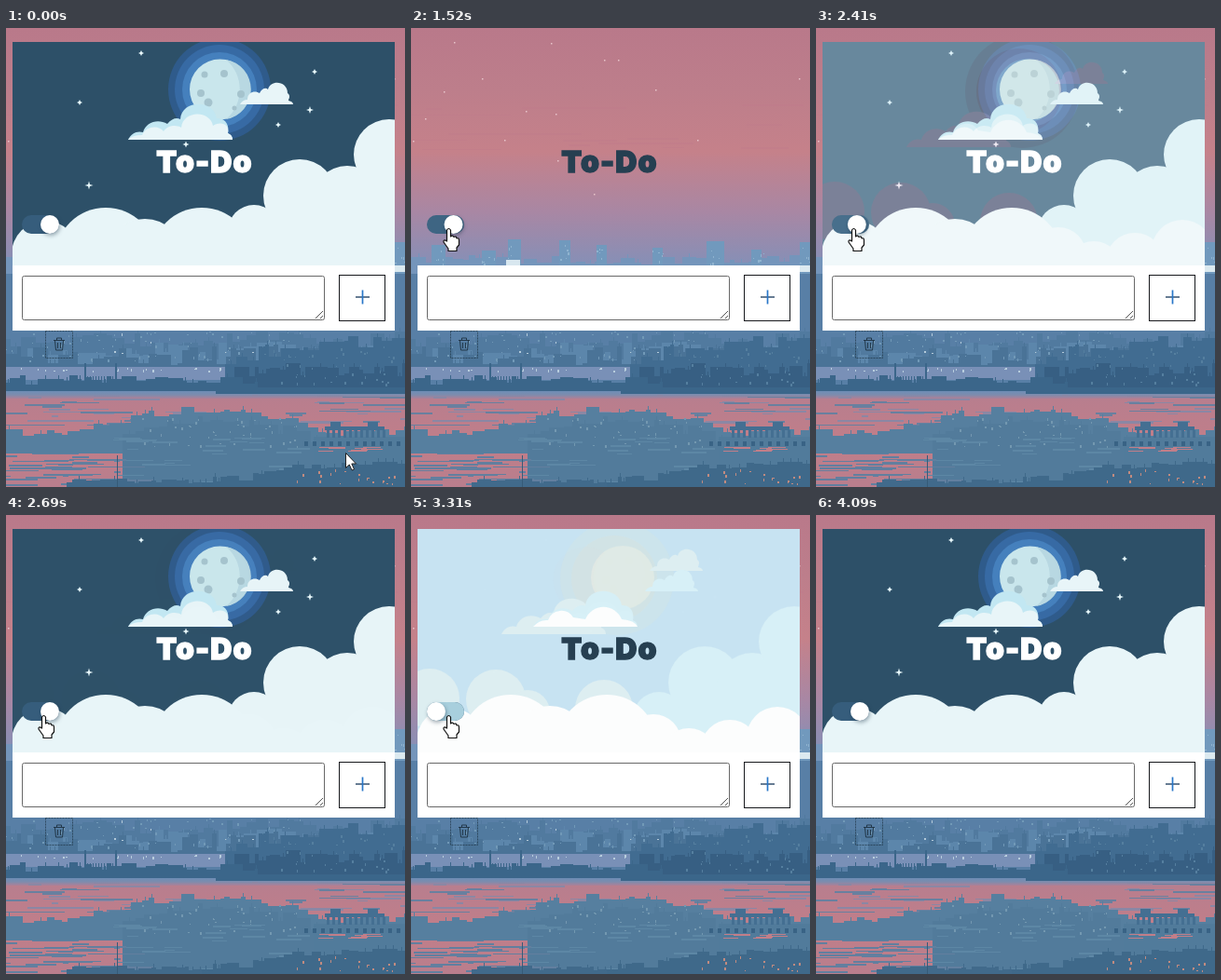
These frames come from a looping animation (428 by 493 pixels, 4560 ms). An HTML page with a canvas:

```html
<!DOCTYPE html>
<html lang="en">
<head>
<meta charset="utf-8">
<title>To-Do</title>
<style>
  html, body { margin: 0; width: 100%; height: 100%; overflow: hidden; }
  body { position: relative; background: #bd7e8b; }
  canvas, svg.scene { position: absolute; left: 0; top: 0; width: 428px; height: 493px; display: block; }
  .title {
    font: 900 32px Inter, "Open Sans", sans-serif; letter-spacing: 1.1px; text-anchor: middle;
    fill: currentColor; stroke: currentColor; stroke-width: 1.4;
  }
  .knob { filter: drop-shadow(1px 2px 2px rgba(20, 45, 65, .4)); }
  .thin { fill: none; stroke: #22384a; }
</style>
</head>
<body>
<canvas id="city" width="428" height="493"></canvas>
<svg class="scene" viewBox="0 0 428 493">
  <defs>
    <path id="moonCloud" d="M131 120C134 113 141 110 147 112C150 101 163 97 173 103C178 97 183 96 187 98C188 77 223 76 226 97C236 96 240 106 238 113Q243 115 243 120Z"/>
    <path id="sideCloud" d="M251 82Q254 77 259 77C259 68 268 67 272 70C275 64 279 64 281 66C284 55 302 57 302 70C306 73 303 76 303 78Q308 79 308 82Z"/>
    <g id="leftBank"></g>
    <g id="rightBank"></g>
  </defs>

  <svg id="banner" x="7" y="15" width="410" height="240" viewBox="7 15 410 240">
    <g>
      <rect x="7" y="15" width="410" height="240" fill="#2d5068"/>
      <circle cx="229" cy="66" r="55" fill="#2f5b8b"/>
      <circle cx="229" cy="66" r="48" fill="#376aa4"/>
      <circle cx="229" cy="66" r="40" fill="#4580bd"/>
      <circle cx="229.500" cy="66" r="32.500" fill="#c9e6ec"/>
      <path d="M236 34A32.500 32.500 0 0 1 236 98A42 42 0 0 0 236 34Z" fill="#b8d8e2"/>
      <g id="craters" fill="#a5c3cd"></g>
      <g id="stars" fill="#e8f8fb"></g>
      <use href="#moonCloud" fill="#c2e7f2"/>
      <path d="M131 120Q135 115 146 115C150 105 164 104 169 111C174 104 183 104 188 107C190 88 219 88 222 105C232 99 240 105 238 113Q243 115 243 120Z" fill="#e8f5f8"/>
      <g fill="#e8f5f8">
        <use href="#sideCloud"/>
        <use href="#leftBank"/>
        <use href="#rightBank"/>
      </g>
    </g>
    <g id="day">
      <rect x="7" y="15" width="410" height="240" fill="#c8e4f3"/>
      <g id="halo">
        <circle cx="221" cy="68" r="61" opacity=".4"/>
        <circle cx="218" cy="68" r="46" opacity=".75"/>
      </g>
      <circle cx="227" cy="67" r="34" fill="#e0ebe6"/>
      <path id="glow" d="M208 41A35 35 0 1 0 211 95A33 33 0 0 1 208 41Z" fill="#e68480"/>
      <g id="backClouds">
        <g id="backBank"></g>
        <use href="#moonCloud" x="-34" y="8"/>
        <use href="#sideCloud" x="5" y="-22"/>
      </g>
      <g fill="#d7f0f7">
        <use href="#sideCloud"/>
        <use href="#moonCloud"/>
        <use href="#rightBank"/>
      </g>
      <g fill="#fdfefe">
        <path d="M131 120Q138 112 147 113A15 15 0 0 1 174 110L187 112A21 21 0 0 1 226 112Q240 113 243 120Z"/>
        <use href="#leftBank"/>
        <g id="frontBank"></g>
      </g>
    </g>
  </svg>

  <text class="title" id="title" x="213" y="155">To-Do</text>
  <rect x="17" y="201" width="40" height="20" rx="10" fill="#365d7c"/>
  <rect id="dayTrack" x="17" y="201" width="40" height="20" rx="10" fill="#a8cfdd"/>
  <circle class="knob" id="knob" cy="211" r="10" fill="#fff"/>

  <rect x="7" y="255" width="410" height="70" fill="#fff"/>
  <rect x="17.500" y="266.500" width="324" height="47" rx="2" fill="#fff" stroke="#686868"/>
  <path d="M332 312L340 304M337 312L340 309" stroke="#555"/>
  <rect x="357.500" y="265.500" width="49" height="49" fill="#fff" stroke="#17191d"/>
  <path d="M375 289H390" stroke="#35516f" stroke-width="1.500"/>
  <path d="M382.500 281.500V296.500" stroke="#2877c8" stroke-width="1.700"/>

  <rect class="thin" x="42.500" y="325.500" width="29" height="29" stroke-dasharray="2 1" opacity=".75"/>
  <path class="thin" d="M51 335.500H63M54.500 335V333H59.500V335M52.500 336L53.500 346H60.500L61.500 336M55.500 338V344M58.500 338V344"/>

  <path id="arrow" d="M.5.5V16.500L4.300 13L7 19L9.500 18L6.800 12H11.500Z" fill="#fff" stroke="#222"/>
  <path id="hand" d="M-2 2Q0-1 2 2V9Q4 7 5.500 9.500Q8 8 8.500 11Q11 10 11 13V18L8.500 21V24.500H-.5V22L-5.500 15Q-6 11.500-2 14Z" fill="#fff" stroke="#111" stroke-width="1.200" stroke-linejoin="round"/>
</svg>

<script>
const $ = id => document.getElementById(id);

// ---- Banner details ----
const puffs = list => list.map(([x, y, r]) => `<circle cx="${x}" cy="${y}" r="${r}"/>`).join('');
const floor = (x, y, w) => `<rect x="${x}" y="${y}" width="${w}" height="${255 - y}"/>`;
const star = ([x, y, r]) =>
  `<path d="M${x} ${y - r}l1 ${r - 1} ${r - 1} 1 ${1 - r} 1 -1 ${r - 1} -1 ${1 - r} ${1 - r} -1 ${r - 1} -1Z"/>`;

$('craters').innerHTML = puffs([[213, 50, 3.5], [209, 70, 4], [234, 49, 4], [217, 80, 4.5], [252, 71, 4], [245, 86, 2.5]]);
$('stars').innerHTML = [[145, 27, 3], [79, 80, 3], [331, 47, 3], [326, 88, 4], [292, 104, 3], [89, 169, 4.5], [193, 125, 3.5]].map(star).join('');
$('leftBank').innerHTML = puffs([[42, 243, 36], [107, 247, 54], [149, 246, 41], [210, 247, 54]]) + floor(7, 238, 410);
$('rightBank').innerHTML = puffs([[266, 218, 28], [315, 180, 39], [366, 186, 38], [411, 136, 38]]) +
  floor(245, 212, 172) + floor(290, 185, 127) + floor(380, 150, 37);
$('backBank').innerHTML = puffs([[20, 197, 32], [91, 198, 32], [125, 212, 24], [207, 208, 31]]);
$('frontBank').innerHTML = puffs([[260, 244, 30], [298, 259, 30], [342, 251, 31], [393, 239, 33]]);

// ---- Pixel city ----
const ctx = $('city').getContext('2d');
let seed = 29;
const rand = () => (seed = (seed * 16807) % 2147483647) / 2147483647;
const between = (a, b) => Math.floor(a + rand() * (b - a));
const hump = (x, from, to) => Math.sin(Math.PI * Math.min(1, Math.max(0, (x - from) / (to - from))));

function box(x, y, w, h, color) {
  ctx.fillStyle = color;
  ctx.fillRect(x, y, w, h);
}
function shade(y, bottom, ...colors) {
  const fill = ctx.createLinearGradient(0, y, 0, bottom);
  colors.forEach((color, i) => fill.addColorStop(i / (colors.length - 1), color));
  box(0, y, 428, bottom - y, fill);
}
// Blocks with random widths and jitter around the roof line roof(x)
function skyline(from, to, roof, jitter, bottom, color) {
  for (let x = from; x < to;) {
    const w = Math.min(between(4, 17), to - x), y = Math.round(roof(x) - rand() * jitter);
    box(x, y, w, bottom - y, color);
    if (rand() > .6) box(x + (w >> 1), y - 4, 1, 4, color);
    x += w;
  }
}
// Streaks thin out from the first edge to the second
function streaks(count, x0, x1, near, far, long, color) {
  for (let i = 0; i < count; i++) box(between(x0, x1), Math.round(near + (far - near) * rand() ** 1.5), between(6, long), between(1, 3), color);
}
function windows(count, x0, x1, y0, y1, color) {
  for (let i = 0; i < count; i++) box(between(x0, x1), between(y0, y1), between(1, 3), between(1, 4), color);
}

function paintCity() {
  shade(0, 265, '#b9798a', '#bd7e8b', '#c5818a', '#a887a4', '#7f91ba');
  streaks(14, -30, 400, 130, 80, 150, 'rgba(190,120,140,.3)');
  for (let i = 0; i < 16; i++) box(between(0, 428), between(10, 185), 1.5, 1.5, '#e7c4ca');

  // Far towers
  skyline(0, 428, () => 254, 10, 330, '#7495bb');
  for (let x = 22; x < 428; x += between(28, 62)) {
    const y = between(227, 243);
    box(x, y, between(10, 20), 100, '#7199bd');
    windows(5, x, x + 14, y + 3, 254, '#8fb3cf');
  }
  box(102, 249, 15, 6, '#d8e7ef');
  box(0, 264, 428, 130, '#587fa6');
  box(417, 255, 11, 7, '#dceaf0');

  // Middle district, darker to the right
  skyline(0, 428, () => 343, 18, 372, '#517a9f');
  skyline(0, 428, () => 357, 20, 372, '#5c86ab');
  skyline(0, 428, () => 362, 22, 372, '#4a7397');
  windows(75, 0, 330, 326, 358, '#7199b7');
  windows(9, 80, 310, 328, 350, '#b3cad9');

  // Waterfront
  box(0, 364, 265, 14, '#7990b7');
  windows(25, 0, 260, 365, 369, '#b7cddd');
  skyline(235, 428, x => 366 - 22 * hump(x, 220, 540), 14, 392, '#416c91');
  skyline(245, 428, () => 374, 14, 392, '#375f83');
  windows(45, 270, 425, 342, 384, '#557f9f');
  skyline(0, 270, () => 383, 10, 390, '#3b668a');
  for (const x of [84, 117]) box(x, 360, 2, 27, '#3b668a');
  for (let x = 87; x < 116; x += 3) box(x, 374, 1, 11, '#3b668a');
  box(0, 386, 428, 4, '#3b668a');

  // Lake
  shade(390, 398, '#6d8db6', '#7d8cad', '#ad8097');
  box(225, 390, 203, 3, '#3b668a');
  shade(398, 493, '#b87e8e', '#c17e89', '#b97e8d');
  streaks(26, -30, 428, 394, 425, 75, '#8b87a4');
  streaks(14, -30, 150, 427, 400, 65, '#69809f');
  streaks(9, 290, 420, 396, 428, 60, '#69809f');

  // Mirrored skyline, tallest in the middle
  const ridge = x => 438 - 24 * hump(x, 75, 345);
  skyline(0, 428, ridge, 9, 457, '#567f9f');
  skyline(125, 345, x => ridge(x) + 12, 10, 493, '#527b9b');
  windows(45, 145, 315, 418, 452, '#7398b0');
  streaks(35, 110, 310, 440, 490, 30, '#5d87a5');
  streaks(32, -30, 120, 456, 490, 70, '#627f9f');

  // Colonnade on the right
  box(330, 439, 98, 54, '#517b9b');
  box(342, 428, 64, 4, '#446f92');
  for (const x of [348, 388]) box(x, 423, 11, 6, '#446f92');
  for (let x = 344; x < 406; x += 6) box(x, 432, 3, 8, '#446f92');
  for (let x = 320; x < 425; x += 9) box(x, 444, 4, 5, '#396385');
  streaks(9, 335, 390, 450, 458, 28, '#c17e89');

  // Foreground
  skyline(185, 428, x => 490 - 17 * hump(x, 230, 500), 9, 493, '#3f698a');
  skyline(65, 210, () => 490, 6, 493, '#416a8b');
  box(119, 459, 1, 34, '#365b78');
  windows(20, 300, 420, 474, 490, '#c18b80');
}
paintCity();

// ---- Motion ----
const LOOP = 4560;
const CLICKS = [1505, 2135, 2730, 3320];  // alternately to day and to night
const FADES = [1490, 2240, 2860, 3430];
const SWAP = [1520, 1590];                // banner is empty while the first day image loads
const HAND = [1220, 3450];
const PATH = [[70, 364, 456], [460, 130, 172], [800, 60, 268], [1150, 32, 231], [1350, 40.5, 215], [3400, 40.5, 215], [3600, 81, 232], [4090, 428, 500]];

const ease = x => 1 - (1 - Math.min(1, Math.max(0, x))) ** 2.3;
const within = (t, [a, b]) => t >= a && t < b;
const passed = (starts, t) => starts.filter(start => t >= start).length;

// 0 is night, 1 is day
function level(starts, t) {
  return starts.reduce((now, start, i) => now + ((i % 2 ? 0 : 1) - now) * ease((t - start) / 500), 0);
}
function pointer(t) {
  const next = PATH.findIndex(([ms]) => ms > t);
  if (next < 1) return PATH[next ? PATH.length - 1 : 0].slice(1);
  const [t0, x0, y0] = PATH[next - 1], [t1, x1, y1] = PATH[next];
  const k = (t - t0) / (t1 - t0);
  return [x0 + (x1 - x0) * k, y0 + (y1 - y0) * k];
}

function pose(t) {
  const fade = level(FADES, t), slide = level(CLICKS, t);
  const toDay = passed(CLICKS, t) % 2 === 1;
  const rosy = !toDay;
  $('banner').style.opacity = within(t, SWAP) ? 0 : 1;
  $('day').style.opacity = fade;
  $('halo').style.fill = rosy ? '#c4a3b2' : '#d5e5e4';
  $('backClouds').style.fill = rosy ? '#fbd2e6' : '#deeff2';
  $('glow').style.opacity = toDay ? 4 * fade * (1 - fade) : 0;
  $('title').style.color = toDay || within(t, SWAP) ? '#263f51' : '#fff';
  $('dayTrack').style.opacity = slide;
  $('knob').setAttribute('cx', 47 - 20 * slide);

  const spot = `translate(${pointer(t)})`, pointing = within(t, HAND);
  $('arrow').setAttribute('transform', spot);
  $('hand').setAttribute('transform', spot);
  $('arrow').style.opacity = !pointing && t < 4085 ? 1 : 0;
  $('hand').style.opacity = pointing ? 1 : 0;
}

const start = performance.now();
function draw() {
  pose((performance.now() - start) % LOOP);
  requestAnimationFrame(draw);
}
draw();
</script>
</body>
</html>
```
